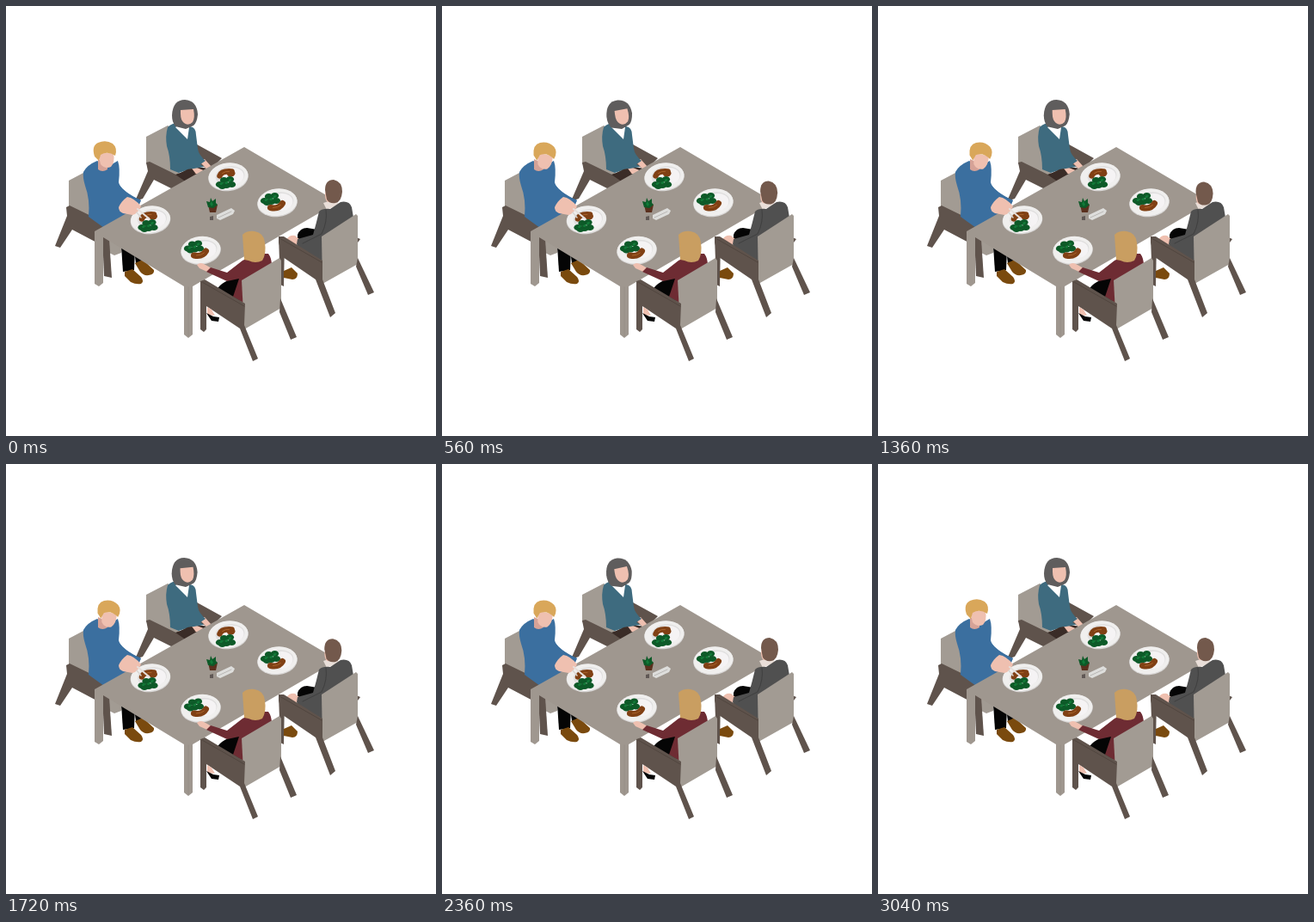
These frames come from a looping animation (500 px wide and 500 px high, 3160 ms). An HTML page with a canvas:

```html
<!DOCTYPE html>
<html lang="en">
<head>
<meta charset="utf-8">
<title>Dinner table</title>
<style>
html, body { margin: 0; width: 100%; height: 100%; overflow: hidden; background: #fff; }
canvas { display: block; width: 500px; height: 500px; }
</style>
</head>
<body>
<canvas id="stage" width="500" height="500"></canvas>
<script>
const ctx = document.getElementById('stage').getContext('2d');
const LOOP = 3160;
const CYCLE = 3040;
const C = {
  wood: '#9f978f', pad: '#a29b93', dark: '#5f534c', skin: '#efc0b0', shade: '#d5a297',
  blue: '#3b6f9f', teal: '#3e6b7f', shoe: '#7a4a0e', suit: '#505050', wine: '#6e2c33',
  black: '#050505', green: '#0d5a28', leaf: '#127a38', meat: '#804014', hair: '#d9a75a'
};

function fill(color, d) {
  ctx.fillStyle = color;
  ctx.fill(new Path2D(d));
}

function line(color, width, d) {
  ctx.strokeStyle = color;
  ctx.lineWidth = width;
  ctx.lineCap = 'round';
  ctx.stroke(new Path2D(d));
}

function oval(color, x, y, rx, ry, turn = 0) {
  ctx.fillStyle = color;
  ctx.beginPath();
  ctx.ellipse(x, y, rx, ry, turn, 0, Math.PI * 2);
  ctx.fill();
}

function posed(x, y, degrees, dx, dy, draw) {
  ctx.save();
  ctx.translate(x + dx, y + dy);
  ctx.rotate(degrees * Math.PI / 180);
  ctx.translate(-x, -y);
  draw();
  ctx.restore();
}

// Straight blend through [time, value] points
function track(t, keys) {
  for (let i = 1; i < keys.length; i++) {
    const [t0, a] = keys[i - 1], [t1, b] = keys[i];
    if (t <= t1) return a + (b - a) * (t - t0) / (t1 - t0);
  }
  return keys[keys.length - 1][1];
}

function greens(x, y) {
  for (const [dx, dy] of [[-7, 2], [-2, -3], [5, -4], [7, 2], [1, 3], [-4, 4]])
    oval(C.green, x + dx, y + dy, 4.6, 3.6);
  for (const [dx, dy] of [[-5, 1], [1, 0], [5, -3]])
    oval(C.leaf, x + dx, y + dy, 2, 1.3, -0.5);
}

function plate(x, y, meatFirst) {
  oval('#d8d6d5', x, y + 0.5, 23.4, 16.2, -0.12);
  oval('#f0efee', x, y - 0.3, 23, 15.7, -0.12);
  oval('#e0dfdf', x + 2, y - 1, 17, 11, -0.12);
  oval('#f5f3f4', x + 5, y - 0.5, 13, 10, -0.12);
  ctx.save();
  ctx.translate(x, y);
  if (meatFirst) {
    line(C.meat, 6.5, 'M-10 -1Q-8 -7 4 -6');
    oval(C.meat, 3, -4, 5, 4);
    line('#a9622a', 1, 'M-7 -4Q-3 -7 1 -6');
    greens(-3, 7);
  } else {
    greens(-8, -4);
    line(C.meat, 7, 'M-8 6Q2 8 6 1');
    line('#a9622a', 1, 'M-5 6Q1 6 4 3');
  }
  ctx.restore();
}

function backChair() {
  fill(C.pad, 'M163 152L188 139L200 146L201 199L163 184Z');
  fill(C.dark, 'M222 161L251 177L238 190L222 184Z');
  fill(C.dark, 'M163 182L167 181L210 202L196 214L172 202L159 224L150 227L165 192Z');
}

function tealWoman(t) {
  fill('#3a2c27', 'M197 196L222 187L236 189L210 205Z');
  fill(C.skin, 'M222 178L231 178L239 187L234 190ZM207 188L217 186L232 192L225 197Z');
  fill(C.teal, 'M188 141Q193 136 200 136L214 140Q221 141 221 150L223 166Q224 173 232 180L226 184L230 187L213 190L201 194L191 190Q191 174 187 163Q185 151 188 141Z');
  fill('#3a2c27', 'M199 196L211 190L216 189L220 194L209 203Z');
  fill('#fff', 'M197 141L203 137L213 141L211 155Z');
  const lean = (1 - Math.cos(Math.min(t, CYCLE) / CYCLE * Math.PI * 4)) / 2;
  posed(210, 142, -8 * lean, 0, 0, () => {
    fill('#5f5d5d', 'M193 127Q194 109 208 109Q222 110 223 126Q222 136 218 139L209 143L197 140Q193 135 193 127Z');
    fill(C.skin, 'M203 121L218 120Q220 130 217 135Q212 140 207 136Q203 133 203 125Z');
  });
}

function leftChair() {
  fill(C.pad, 'M73 203L90 194L108 205L107 252L73 235Z');
  fill(C.dark, 'M70 234L74 232L113 251L113 279L77 260L63 281L57 279L71 244Z');
  fill(C.pad, 'M118 270L135 281L134 287L126 290L120 287Z');
  fill(C.dark, 'M112 266L120 271L123 316L114 314Z');
}

function blueManLegs() {
  fill(C.black, 'M134 279L150 283L149 307L136 309Z');
  fill(C.black, 'M149 284L161 291L160 298L151 299Z');
  fill(C.shoe, 'M150 299L159 295L172 307Q173 312 166 313Q160 314 156 309Z');
  fill(C.shoe, 'M138 309L147 306L157 315Q161 320 157 323Q151 324 145 321L138 314Z');
}

function blueMan(t) {
  fill(C.blue, 'M90 193Q94 185 106 180L118 187L130 180Q133 188 131 205Q133 215 157 226L153 236L133 247L114 258L96 245Q98 225 92 209Q89 199 90 193Z');
  fill(C.shade, 'M107 178L118 183L118 190Q112 194 107 190Z');
  const lean = track(t, [[0, 0], [560, 0.61], [880, 1], [1360, 0.61], [2680, 0.61], [3040, 0]]);
  posed(111, 190, 21 * lean, 0, 0, () => {
    fill(C.skin, 'M107 171L125 171Q127 182 122 187Q115 190 110 184Z');
    fill(C.hair, 'M103 175Q99 163 107 159Q116 155 124 160Q130 165 127 174Q118 168 110 173L108 180Z');
  });
}

function table() {
  fill(C.wood, 'M277 164L386 228L217 326V382L212 386L207 382V326L113 269V322L108 326L103 323V262Z');
  line('#968e86', 1, 'M212 327V384');
}

function centre() {
  fill('#5a301e', 'M235 231L246 231L244 240L237 240Z');
  fill(C.green, 'M233 227L237 228L238 223L240 227L244 224L244 229L246 231L241 235L235 234Z');
  fill(C.leaf, 'M237 230L239 227L241 231L239 233Z');
  fill('#605855', 'M237 245L241 244L241 249L237 249Z');
  fill('#dededc', 'M245 243L262 235L266 238L264 242L249 249L245 247Z');
  line('#b9b7b5', 1, 'M247 246L262 239');
}

function blueHand() {
  fill(C.blue, 'M131 207Q138 218 157 226L151 232L138 237L131 232Z');
  fill(C.skin, 'M131 234Q134 227 141 222Q149 223 157 233Q153 242 147 243L136 241Q131 239 131 234Z');
  line('#e5dfdc', 2, 'M153 236L166 247');
  line('#d9d6d3', 1.5, 'M152 240L157 246');
}

function greyMan(t) {
  fill(C.dark, 'M317 268L324 271L323 326L319 324Z');
  fill(C.shoe, 'M323 308L332 304L339 311Q339 318 333 318L323 316Z');
  fill(C.dark, 'M398 265L412 271L409 275L397 270Z');
  fill(C.black, 'M339 266Q342 258 350 258L362 260L356 274L339 273Z');
  fill(C.skin, 'M326 272Q329 266 336 267L341 271L339 277L329 278Z');
  fill('#e9ded8', 'M369 229L378 226L389 230L373 237Z');
  fill(C.suit, 'M364 239Q368 235 377 236L389 228Q399 226 402 234L404 246L369 297L342 284L338 277L339 271L357 266Q361 252 364 239Z');
  line('#3f3f3f', 1, 'M372 237Q374 251 367 265L345 276');
  const lean = track(t, [[0, 0], [560, 0.6], [880, 1], [1360, 1], [2080, 0]]);
  posed(378, 233, -2 * lean, -0.8 * lean, 2.5 * lean, () => {
    oval(C.skin, 375, 220, 4, 8);
    fill('#73594c', 'M371 214Q371 202 381 202Q391 204 391 216Q390 228 383 229Q376 230 373 225Z');
  });
  fill(C.pad, 'M367 268L407 242L409 244V300L368 323Z');
  fill(C.dark, 'M317 268L323 268L368 296V318L383 357L377 362L360 318L322 292L317 275Z');
  fill(C.dark, 'M409 293L428 333L421 336L407 303Z');
  line('#51463f', 1, 'M318 270L367 298');
}

function wineWoman() {
  fill(C.black, 'M244 331Q252 318 271 316L276 344L246 336Z');
  fill(C.skin, 'M222 301Q226 297 232 301L239 305L234 309L225 305Z');
  fill(C.wine, 'M238 304L257 310L275 296L291 288L305 288Q309 293 309 302L276 345L264 338L271 317L257 320L233 309Z');
  fill(C.pad, 'M274 319L318 293L320 296V351L277 376Z');
  fill('#c99e61', 'M275 266Q280 261 289 262Q300 264 301 275Q303 288 298 296Q290 300 282 296L277 295Z');
  fill(C.dark, 'M226 320L231 318L278 346L277 371L293 410L287 413L272 375L233 349V376L230 379L226 376Z');
  fill(C.dark, 'M319 340L338 385L331 388L318 356Z');
  fill(C.skin, 'M234 350L239 353L243 360L234 359Z');
  fill(C.black, 'M233 357L241 361L248 362L247 367L239 366Z');
  line('#51463f', 1, 'M228 321L277 349');
}

function draw(t) {
  ctx.fillStyle = '#fff';
  ctx.fillRect(0, 0, 500, 500);
  backChair();
  tealWoman(t);
  leftChair();
  blueManLegs();
  blueMan(t);
  table();
  plate(258.5, 198.5, true);
  plate(315.5, 228.5, false);
  plate(168, 248.5, true);
  plate(226.5, 284, false);
  centre();
  blueHand();
  greyMan(t);
  wineWoman();
}

function tick() {
  draw(performance.now() % LOOP);
  requestAnimationFrame(tick);
}
tick();
</script>
</body>
</html>
```
